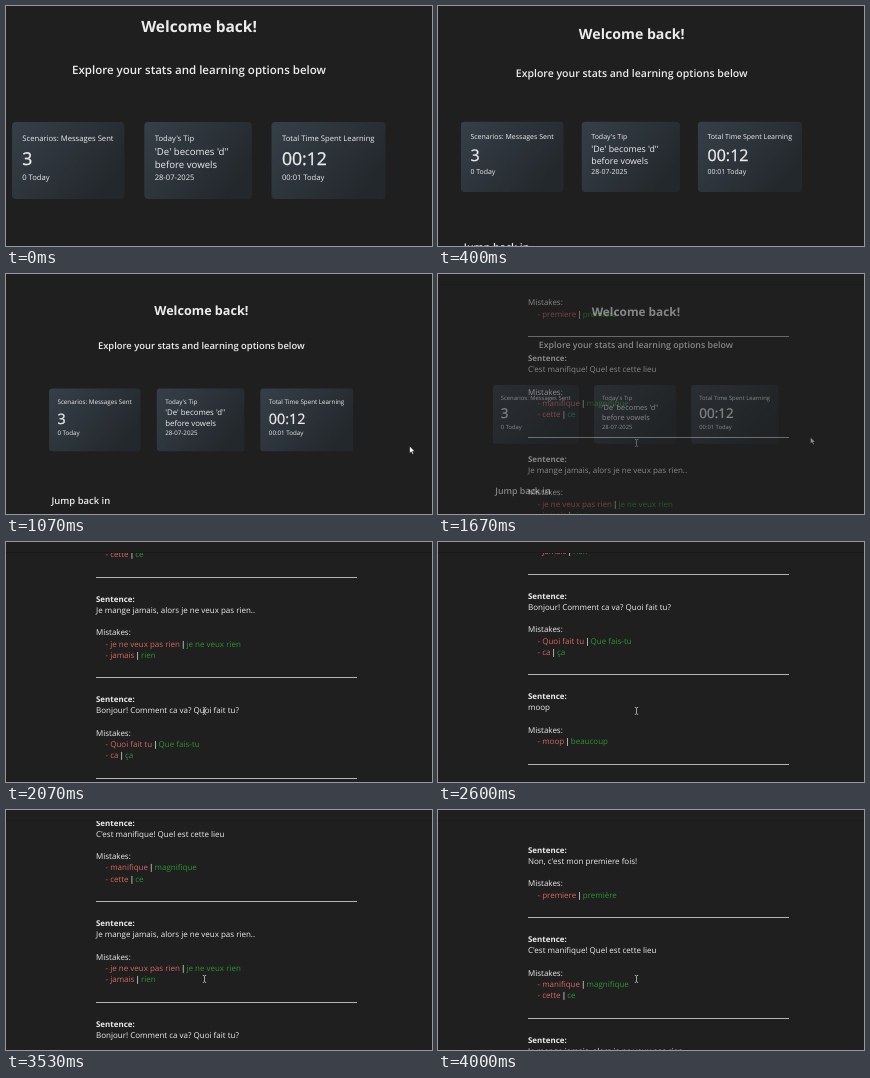
Recreate the animation shown at these times as an HTML page. Size 426x240 px, loop 4070 ms.

```html
<!DOCTYPE html>
<html lang="en">
<head>
<meta charset="utf-8">
<title>Learning dashboard</title>
<style>
  html, body { margin: 0; width: 100%; height: 100%; overflow: hidden; background: #1f1f1f; }
  svg { display: block; width: 100%; height: 100%; }
  text {
    font-family: "Open Sans", "Noto Sans", sans-serif;
    fill: #ececec;
    text-rendering: geometricPrecision;
    white-space: pre;
  }
  .semi { font-weight: 600; }
  .bold { font-weight: 700; }
  .big { stroke: #ececec; stroke-width: .3; }
  .bad { fill: #d4685b; }
  .good { fill: #2b9431; }
</style>
</head>
<body>
<svg id="stage" viewBox="0 0 426 240">
  <defs>
    <linearGradient id="card" x1="0" y1="0" x2="1" y2=".55">
      <stop offset="0" stop-color="#363f49"/>
      <stop offset="1" stop-color="#23282c"/>
    </linearGradient>
    <clipPath id="below"><rect y="10.5" width="426" height="230"/></clipPath>
  </defs>
  <rect width="426" height="240" fill="#1f1f1f"/>
  <g id="dash"></g>
  <g id="review">
    <rect width="426" height="240" fill="#1f1f1f"/>
    <g clip-path="url(#below)"><g id="list"></g></g>
    <rect y="10" width="426" height="1" fill="#191919"/>
    <path d="M196.8 165.5h1.2l.5.5.5-.5h1.2M198.5 166v5.8M196.8 172.3h1.2l.5-.5.5.5h1.2"
          fill="none" stroke="#c4c4c4" stroke-width=".8"/>
  </g>
</svg>
<script>
const LOOP = 4070, STEP = 1000 / 15;
const $ = id => document.getElementById(id);

function add(parent, tag, attrs, content = "") {
  const el = document.createElementNS("http://www.w3.org/2000/svg", tag);
  for (const k in attrs) el.setAttribute(k, attrs[k]);
  el.textContent = content;
  parent.append(el);
  return el;
}
const label = (parent, x, y, size, str, extra) =>
  add(parent, "text", { x, y, "font-size": size, ...extra }, str);

// Dashboard
const dash = $("dash");
const centred = { "text-anchor": "middle" };
label(dash, 193, 25.6, 15.5, "Welcome back!", { ...centred, class: "bold" });
label(dash, 193, 67.6, 11.53, "Explore your stats and learning options below", { ...centred, class: "semi" });
label(dash, 9, 258.2, 11.6, "Jump back in", { class: "semi" });

const cards = [
  [6, 112.3, 16.3, "Scenarios: Messages Sent", ["3"], "0 Today"],
  [138.3, 107.5, 148.7, "Today's Tip", ["'De' becomes 'd''", "before vowels"], "28-07-2025"],
  [265.5, 114, 276, "Total Time Spent Learning", ["00:12"], "00:01 Today"]
];
for (const [x, width, tx, head, body, foot] of cards) {
  add(dash, "rect", { x, y: 116, width, height: 77, rx: 4, fill: "url(#card)" });
  label(dash, tx, 135.2, 7.66, head);
  if (body.length === 1) label(dash, tx, 159.3, 17.6, body[0], { class: "big" });
  else body.forEach((line, i) => label(dash, tx, 148.7 + 13.4 * i, 9.65, line));
  label(dash, tx, 173.6, 7.6, foot);
}
const arrow = add(dash, "path", {
  d: "M0 0V8.6L2 6.8 3.4 9.8 4.8 9.2 3.4 6.3H6Z",
  fill: "#fff", stroke: "#111", "stroke-width": .5
});

// Sentence review list
const list = $("list");
const entries = [
  ["Non, c'est mon premiere fois!", ["premiere", "première"]],
  ["C'est manifique! Quel est cette lieu", ["manifique", "magnifique"], ["cette", "ce"]],
  ["Je mange jamais, alors je ne veux pas rien..", ["je ne veux pas rien", "je ne veux rien"], ["jamais", "rien"]],
  ["Bonjour! Comment ca va? Quoi fait tu?", ["Quoi fait tu", "Que fais-tu"], ["ca", "ça"]],
  ["moop", ["moop", "beaucoup"]]
];
let y = 42.9;
for (const [sentence, ...mistakes] of entries) {
  label(list, 90, y, 7.95, "Sentence:", { class: "bold" });
  label(list, 90, y + 11, 8, sentence);
  label(list, 90, y + 33.5, 8, "Mistakes:");
  y += 33.5;
  for (const [bad, good] of mistakes) {
    y += 11.2;
    const row = label(list, 99.5, y, 8, "");
    add(row, "tspan", { class: "bad" }, "- " + bad + " ");
    add(row, "tspan", { class: "semi", dx: -1 }, "|");
    add(row, "tspan", { class: "good", dx: -1 }, " " + good);
  }
  add(list, "rect", {
    x: 90, y: y + 19.4, width: 261, height: 1, fill: "#b4b4b4", "shape-rendering": "crispEdges"
  });
  y += 44.65;
}

// Motion
const zoomTimes = [0, 400, 1067, 1667];
const scaleAt = [1, .913, .814, .764];
const leftAt = [0, 17.5, 38.2, 50.4];
const topAt = [0, 9.75, 20.1, 22.4];

// Cubic through four points
const cubic = (vals, t) => vals.reduce((sum, v, i) =>
  sum + zoomTimes.reduce((p, q, j) => j === i ? p : p * (t - q) / (zoomTimes[i] - q), v), 0);

function track(keys, t) {
  if (t <= keys[0][0]) return keys[0][1];
  for (let i = 1; i < keys.length; i++) {
    const [a, u] = keys[i - 1], [b, v] = keys[i];
    if (t <= b) return u + (v - u) * (t - a) / (b - a);
  }
  return keys[keys.length - 1][1];
}
const scroll = [
  [1400, 0], [1530, 12], [1667, 45], [2000, 152], [2270, 237], [2400, 267], [2480, 276.4],
  [2610, 276.4], [2800, 270], [2930, 260], [3133, 236], [3267, 205], [3400, 172],
  [3530, 118], [3667, 58], [3800, 13], [3870, 2], [3930, .5], [4000, 0]
];
const fade = [[1530, 0], [1667, .5], [1800, 1]];
const pointerX = [[1130, 449], [1667, 421.6], [1800, 417]];
const pointerY = [[1130, 186.8], [1667, 184.2]];
const held = [9, 50];

function draw(now) {
  let tick = Math.floor((now % LOOP + 5) / STEP);
  if (held.includes(tick)) tick--;
  const t = Math.min(tick, 60) * STEP;
  const p = track(fade, t);
  if (p < 1) {
    const s = cubic(scaleAt, t);
    dash.setAttribute("transform", `translate(${cubic(leftAt, t)} ${cubic(topAt, t)}) scale(${s})`);
    arrow.setAttribute("transform", `translate(${track(pointerX, t)} ${track(pointerY, t)})`);
  }
  dash.setAttribute("visibility", p < 1 ? "visible" : "hidden");
  $("review").setAttribute("opacity", p);
  list.setAttribute("transform", `translate(0 ${-track(scroll, t)})`);
}

const start = performance.now();
function loop() {
  draw(performance.now() - start);
  requestAnimationFrame(loop);
}
loop();
</script>
</body>
</html>
```
